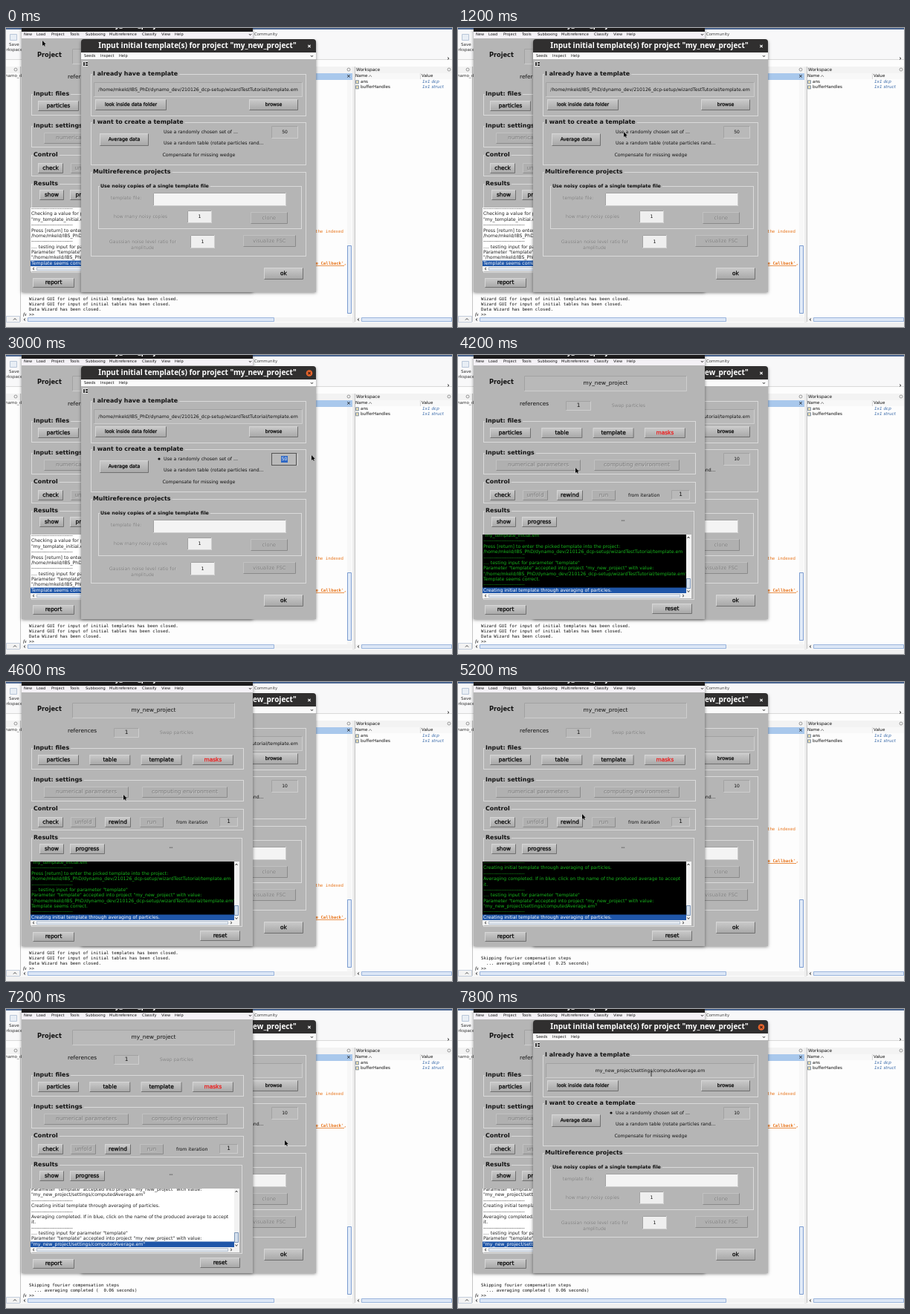
Recreate the animation shown at these times as an HTML page with a canvas. Size 600 by 403 pixels, loop 8000 ms.

```html
<!DOCTYPE html>
<html lang="en">
<head>
<meta charset="utf-8">
<title>Template wizard</title>
<style>
  html, body { margin: 0; width: 100%; height: 100%; overflow: hidden; background: #fff; }
  canvas { display: block; }
</style>
</head>
<body>
<canvas id="stage" width="600" height="403"></canvas>
<script>
const ctx = document.getElementById('stage').getContext('2d');
const LOOP = 8000, STEP = 200;
const SANS = '"DejaVu Sans", sans-serif';
const MONO = '"DejaVu Sans Mono", monospace';
const TITLE = { size: 10, style: 'bold', color: '#fff', family: '"Noto Sans", sans-serif', align: 'center' };
const GREY = '#b5b5b5', ORANGE = '#e8761e', BLUE = '#1f56a8';

const OLD_PATH = '/home/mkeld/IBS_PhD/dynamo_dev/210126_dcp-setup/wizardTestTutorial/template.em';
const NEW_PATH = 'my_new_project/settings/computedAverage.em';
const RULE = '-------------------------';
const accepted = path => [
  '.... testing input for parameter "template"',
  'Parameter "template" accepted into project "my_new_project" with value:',
  `"${path}"`];
const averaging = [
  RULE, 'Creating initial template through averaging of particles.', RULE,
  'Averaging completed. If in blue, click on the name of the produced average to accept', 'it.',
  RULE, ...accepted(NEW_PATH)];
const LOG = [
  RULE, 'Checking a value for parameter "template"', '"my_template_initial.em"', RULE,
  'Press [return] to enter the picked template into the project:', OLD_PATH, RULE,
  ...accepted(OLD_PATH), 'Template seems correct.', ...averaging, ...averaging];

// Moments, in ms, at which the interface reacts
const PICK = 1400, SELECT = 2800, TYPE = 3200, RUN = 4200, FIRST_DONE = 5000, SECOND_DONE = 5400, RAISE = 7400;

// Pointer stops: time, x, y
const POINTER = [
  [0, 49, 17], [1200, 223, 140], [1600, 223, 140], [2200, 371, 138], [2600, 371, 138],
  [3000, 411, 135], [3200, 411, 135], [3800, 158, 152], [4600, 158, 152], [5200, 167, 178],
  [6000, 167, 178], [7200, 375, 177], [7400, 375, 177], [7800, 260, 87], [8000, 260, 87]];

function rect(x1, y1, x2, y2, color) {
  ctx.fillStyle = color;
  ctx.fillRect(x1, y1, x2 - x1, y2 - y1);
}

function line(color, width, ...points) {
  ctx.strokeStyle = color;
  ctx.lineWidth = width;
  ctx.beginPath();
  points.forEach(([x, y]) => ctx.lineTo(x, y));
  ctx.stroke();
}

function disc(x, y, r, color) {
  ctx.fillStyle = color;
  ctx.beginPath();
  ctx.arc(x, y, r, 0, 7);
  ctx.fill();
}

function text(str, x, y, { size = 6.2, color = '#111', style = '', family = SANS, align = 'left', heavy } = {}) {
  ctx.font = `${style} ${size}px ${family}`;
  ctx.fillStyle = ctx.strokeStyle = color;
  ctx.textAlign = align;
  ctx.textBaseline = 'middle';
  ctx.fillText(str, x, y);
  if (heavy) {
    ctx.lineWidth = .25;
    ctx.strokeText(str, x, y);
  }
}

function clipped(x1, y1, x2, y2, paint) {
  ctx.save();
  ctx.beginPath();
  ctx.rect(x1, y1, x2 - x1, y2 - y1);
  ctx.clip();
  paint();
  ctx.restore();
}

function bevel(x1, y1, x2, y2, fill, light, dark) {
  rect(x1, y1, x2, y2, fill);
  line(light, 1, [x1 + .5, y2 - .5], [x1 + .5, y1 + .5], [x2 - .5, y1 + .5]);
  line(dark, 1, [x1 + .5, y2 - .5], [x2 - .5, y2 - .5], [x2 - .5, y1 + .5]);
}

function faded(str, x, y, size = 6.2, align = 'left') {
  text(str, x + .6, y + .6, { size, align, color: '#cdcdcd' });
  text(str, x, y, { size, align, color: '#7c7c7c' });
}

function button(label, x1, y1, x2, y2, { size = 7.4, color = '#000', disabled } = {}) {
  const cx = (x1 + x2) / 2, cy = (y1 + y2) / 2;
  if (disabled) {
    bevel(x1, y1, x2, y2, '#b0b0b0', '#c2c2c2', '#8a8a8a');
    faded(label, cx, cy, size, 'center');
  } else {
    const shade = ctx.createLinearGradient(0, y1, 0, y2);
    shade.addColorStop(0, '#cbcbcb');
    shade.addColorStop(1, '#a6a6a6');
    bevel(x1, y1, x2, y2, shade, '#d6d6d6', '#707070');
    text(label, cx, cy, { size, color, align: 'center', heavy: true });
  }
}

function field(value, x1, y1, x2, y2, size = 6.2, fill = '#b9b9b9') {
  bevel(x1, y1, x2, y2, fill, '#a2a2a2', '#cecece');
  text(value, (x1 + x2) / 2, (y1 + y2) / 2, { size, align: 'center' });
}

function group(title, x1, y1, x2, y2, size = 7.9) {
  ctx.strokeStyle = '#dadada';
  ctx.lineWidth = 1;
  ctx.strokeRect(x1 + .5, y1 + .5, x2 - x1, y2 - y1);
  ctx.font = `bold ${size}px ${SANS}`;
  const left = x1 + 3;
  rect(left - 1, y1 - 3, left + ctx.measureText(title).width + 2, y1 + 4, GREY);
  text(title, left, y1, { size, style: 'bold' });
}

function menu(items, y) {
  for (const [x, label] of items) text(label, x, y, { size: 5.1 });
}

function undockArrow(x, y) {
  line('#333', 1, [x, y - 1], [x + 1.5, y + .8], [x + 3, y - 1]);
}

function windowBase(x1, y1, x2, y2) {
  ctx.save();
  ctx.shadowColor = 'rgba(0,0,0,.45)';
  ctx.shadowBlur = 4;
  ctx.shadowOffsetY = 1;
  rect(x1, y1, x2, y2, GREY);
  ctx.restore();
}

function scrollArrow(x, y, dir) {
  line('#444', 1, [x - dir, y - 1.5], [x + dir, y], [x - dir, y + 1.5]);
}

function desktop(state) {
  rect(0, 0, 600, 403, '#fdfdfd');
  rect(0, 0, 600, 2, '#4a6590');
  rect(0, 2, 600, 43, '#f8f8f9');
  line('#dadada', 1, [0, 42.5], [600, 42.5]);
  rect(0, 52, 600, 61, '#f3f3f3');
  rect(0, 397, 600, 403, '#f0f0f0');

  text('Community', 334, 9, { size: 5.4, color: '#444' });
  scrollArrow(595, 41, 1);
  bevel(5, 8, 15, 17, '#e8eef5', '#b9c6d8', '#b9c6d8');
  text('Save', 4, 23, { size: 5.6, color: '#333' });
  text('orkspace', -3, 30, { size: 5.6, color: '#333' });
  text('namo_de', -1, 65, { size: 5.6, color: '#333' });
  for (const x of [13, 461, 596]) {
    ctx.strokeStyle = '#777';
    ctx.lineWidth = .7;
    ctx.beginPath();
    ctx.arc(x, 56, 2, 0, 7);
    ctx.stroke();
  }

  // Command window
  rect(21, 61, 466, 70, '#a9c8ec');
  text('×', 461, 65, { size: 7, align: 'center' });
  rect(459, 70, 465, 390, '#f7f7f7');
  bevel(459, 293, 465, 385, '#e2ebf8', '#7c9cd0', '#7c9cd0');
  rect(466, 52, 469, 397, '#ececec');
  line('#c4c4c4', 1, [19.5, 52], [19.5, 396]);
  const mono = { size: 5.75, family: MONO };
  text('the indexed', 454, 274 - state.scroll, { ...mono, color: ORANGE, align: 'right' });
  text("te Callback',", 458, 317 - state.scroll, { ...mono, color: ORANGE, style: 'bold', align: 'right' });
  line(ORANGE, .8, [410, 320.5 - state.scroll], [455, 320.5 - state.scroll]);
  state.output.forEach((row, i) => text(row, 31, 365 + 7 * i, mono));
  text('fx', 23, 386, { size: 6.5, style: 'italic', family: '"Liberation Serif", serif' });
  text('>>', 31, 386, mono);

  // Workspace
  rect(469, 61, 600, 69, '#f8f8f8');
  line('#c4c4c4', 1, [469.5, 52], [469.5, 396]);
  line('#d8d8d8', 1, [557.5, 61], [557.5, 69]);
  text('Workspace', 471, 56, { size: 5.9 });
  text('Name', 470, 65, { size: 5.6 });
  line('#666', .7, [488, 66], [490, 63.5], [492, 66]);
  text('Value', 559, 65, { size: 5.6 });
  [['ans', '1x1 dcp'], ['bufferHandles', '1x1 struct']].forEach(([name, value], i) => {
    const y = 72.3 + 7 * i;
    bevel(470, y - 2, 475, y + 3, '#e9ddb0', '#8295b0', '#8295b0');
    text(name, 477, y, { size: 5.7 });
    text(value, 560, y, { size: 5.7, color: '#3567a8', style: 'italic' });
  });

  // Bottom scrollbars
  for (const [left, right, thumbEnd] of [[21, 466, 361], [470, 600, 600]]) {
    rect(left, 390, right, 396, '#f3f3f3');
    bevel(left + 8, 390, thumbEnd, 396, '#dce7f6', '#9ab4dc', '#9ab4dc');
    scrollArrow(left + 4, 393, -1);
  }
  bevel(0, 388, 19, 397, '#f3f3f3', '#c4cedd', '#c4cedd');
  line('#444', 1, [10, 393.5], [12, 391.5], [14, 393.5]);
}

function logPanel(state) {
  rect(33, 242, 314, 328, '#f2f2f2');
  clipped(33, 242, 307, 321, () => {
    rect(33, 242, 307, 321, state.busy ? '#000' : '#fff');
    rect(33, 313.5, 307, 321, BLUE);
    for (let i = 0; i <= 10; i++) {
      const color = i === 0 ? '#fff' : state.busy ? '#17b51c' : '#222';
      text(LOG[state.logEnd - i], 34, 317 - 7.35 * i, { color });
    }
  });
  bevel(307, 301, 313, 315, '#d4dfec', '#7d97b8', '#7d97b8');
  bevel(41, 322, 299, 327, '#e2e8f0', '#b4c0d0', '#b4c0d0');
  line('#444', 1, [308.5, 247], [310, 245], [311.5, 247]);
  line('#444', 1, [308.5, 317.5], [310, 319.5], [311.5, 317.5]);
  scrollArrow(37, 324.5, -1);
  scrollArrow(303, 324.5, 1);
}

function projectWindow(state) {
  windowBase(21, 0, 332, 356);
  rect(21, 0, 332, 5, '#1c1b1c');
  text('my_new_project', 177, -4, TITLE);
  rect(21, 5, 332, 14, '#f4f1f6');
  menu([[24, 'New'], [41, 'Load'], [61, 'Project'], [86, 'Tools'], [107, 'Subboxing'],
    [139, 'Multireference'], [183, 'Classify'], [209, 'View'], [227, 'Help']], 9);
  undockArrow(327, 9);

  text('Project', 42, 36.5, { size: 8.2, style: 'bold' });
  field('my_new_project', 89, 28, 308, 49, 7.4);
  text('references', 83, 66.5, { size: 7.4 });
  field('1', 145, 62, 179, 75, 7.4);
  faded('Swap particles', 207, 68);

  group('Input: files', 34, 89, 319, 117);
  ['particles', 'table', 'template', 'masks'].forEach((label, i) =>
    button(label, 43 + 69.3 * i, 98, 98 + 69.3 * i, 112, { color: i === 3 ? '#f01818' : '#000' }));

  group('Input: settings', 34, 132, 319, 160);
  button('numerical parameters', 51, 141, 165, 156, { disabled: true });
  button('computing environment', 183, 141, 298, 156, { disabled: true });

  group('Control', 34, 171, 319, 199);
  button('check', 43, 182, 77, 196);
  button('unfold', 87, 182, 121, 196, { disabled: true });
  button('rewind', 133, 182, 168, 196);
  button('run', 180, 182, 212, 196, { disabled: true });
  text('from iteration', 229, 189.5);
  field('1', 287, 182, 312, 195, 7.4);

  group('Results', 34, 210, 317, 329);
  button('show', 45, 218, 78, 232);
  button('progress', 86, 218, 133, 232);
  text('--', 222, 223, { size: 7, align: 'center' });
  logPanel(state);
  button('report', 36, 337, 92, 350);
  button('reset', 261, 335, 315, 349);
}

function templateDialog(state) {
  windowBase(101, 17, 417, 356);
  ctx.fillStyle = '#302f2f';
  ctx.beginPath();
  ctx.roundRect(101, 15, 316, 19, [4, 4, 0, 0]);
  ctx.fill();
  text('Input initial template(s) for project "my_new_project"', 257.5, 24, TITLE);
  if (state.focused) disc(408, 24.5, 4.3, '#e9652c');
  const cross = state.focused ? '#3a2018' : '#fff';
  line(cross, 1.1, [406.3, 22.8], [409.7, 26.2]);
  line(cross, 1.1, [409.7, 22.8], [406.3, 26.2]);

  rect(101, 33, 417, 42, '#fafafa');
  menu([[105, 'Seeds'], [127, 'Inspect'], [152, 'Help']], 38);
  undockArrow(410, 38);
  rect(103, 45, 110, 52, '#e6e6e6');
  rect(104, 46, 106, 51, '#333');
  rect(107, 46, 110, 48, '#333');
  rect(107, 49, 110, 51, '#333');

  group('I already have a template', 114, 62, 403, 118);
  field(state.path, 118, 73, 399, 93);
  button('look inside data folder', 120, 96, 216, 111, { size: 6.3 });
  button('browse', 327, 96, 393, 111, { size: 6.3 });

  group('I want to create a template', 114, 127, 403, 184);
  button('Average data', 126, 142, 192, 159, { size: 6.4 });
  ['Use a randomly chosen set of ...', 'Use a random table (rotate particles rand...', 'Compensate for missing wedge']
    .forEach((label, i) => text(label, i < 2 ? 212 : 210.5, 140 + 15.5 * i));
  if (state.picked) disc(206, 140, 1.6, '#111');
  field(state.count, 357, 132, 393, 149, 6);
  if (state.editing) {
    ctx.strokeStyle = '#555';
    ctx.strokeRect(357.5, 132.5, 33, 16);
  }
  if (state.selected) {
    rect(370, 136, 379, 145, '#2f68c4');
    text(state.count, 374.5, 140.5, { size: 6, color: '#fff', align: 'center' });
  }

  group('Multireference projects', 114, 194, 403, 307);
  group('Use noisy copies of a single template file', 124, 213, 397, 270, 6.3);
  faded('template file:', 141, 229);
  field('', 198, 222, 377, 240, 6.2, '#f4f4f4');
  faded('how many noisy copies', 145, 254);
  field('1', 244, 246, 277, 263, 6.2, '#efefef');
  button('clone', 329, 248, 379, 264, { size: 6.8, disabled: true });
  faded('Gaussian noise level ratio for', 184, 288, 6.2, 'center');
  faded('amplitude', 184, 296, 6.2, 'center');
  field('1', 248, 279, 281, 297, 6.2, '#efefef');
  button('visualize FSC', 319, 279, 390, 295, { size: 6.8, disabled: true });
  button('ok', 347, 323, 400, 339);
}

function pointer(t, dialogInFront) {
  const i = POINTER.findIndex(stop => stop[0] > t);
  const [t0, x0, y0] = POINTER[i - 1], [t1, x1, y1] = POINTER[i];
  const p = (t - t0) / (t1 - t0), ease = p * p * (3 - 2 * p);
  const x = x0 + (x1 - x0) * ease, y = y0 + (y1 - y0) * ease;
  const overPath = x > 118 && x < 399 && y > 73 && y < 93;
  if (dialogInFront && overPath) {
    line('#222', .9, [x, y - 4], [x, y + 4]);
    return;
  }
  ctx.beginPath();
  [[0, 0], [0, 7], [1.7, 5.5], [2.8, 7.8], [3.9, 7.3], [2.8, 5], [4.8, 4.9]]
    .forEach(([dx, dy]) => ctx.lineTo(x + dx, y + dy));
  ctx.closePath();
  ctx.strokeStyle = '#ddd';
  ctx.lineWidth = .8;
  ctx.stroke();
  ctx.fillStyle = '#000';
  ctx.fill();
}

// Picks the value of the last entry that has begun by time t.
const at = (t, ...entries) => entries.filter(([start]) => t >= start).pop()[1];

function stateAt(t) {
  const finished = seconds => ['', 'Skipping fourier compensation steps', `  ... averaging completed (  ${seconds} seconds)`];
  const wizard = [
    'Wizard GUI for input of initial templates has been closed.',
    'Wizard GUI for input of initial tables has been closed.',
    'Data Wizard has been closed.'];
  const dialogInFront = t < RUN || t >= RAISE;
  return {
    dialogInFront,
    focused: dialogInFront && t >= PICK,
    busy: t >= RUN && t < SECOND_DONE,
    logEnd: at(t, [0, 10], [RUN, 12], [FIRST_DONE, 21], [SECOND_DONE, 28]),
    scroll: at(t, [0, 0], [FIRST_DONE, 76], [SECOND_DONE, 160]),
    output: at(t, [0, wizard], [FIRST_DONE, finished('0.25')], [SECOND_DONE, finished('0.06')]),
    path: at(t, [0, OLD_PATH], [FIRST_DONE, NEW_PATH]),
    picked: t >= PICK,
    editing: t >= SELECT - STEP && t < RUN,
    selected: t >= SELECT && t < TYPE,
    count: at(t, [0, '50'], [TYPE, '1'], [TYPE + STEP, '10'])
  };
}

function draw(now) {
  const t = Math.floor(now % LOOP / STEP) * STEP;
  const state = stateAt(t);
  const windows = [projectWindow, templateDialog];
  if (!state.dialogInFront) windows.reverse();
  desktop(state);
  windows.forEach(paint => paint(state));
  pointer(t, state.dialogInFront);
}

const start = performance.now();
function tick() {
  draw(performance.now() - start);
  requestAnimationFrame(tick);
}
tick();
</script>
</body>
</html>
```
